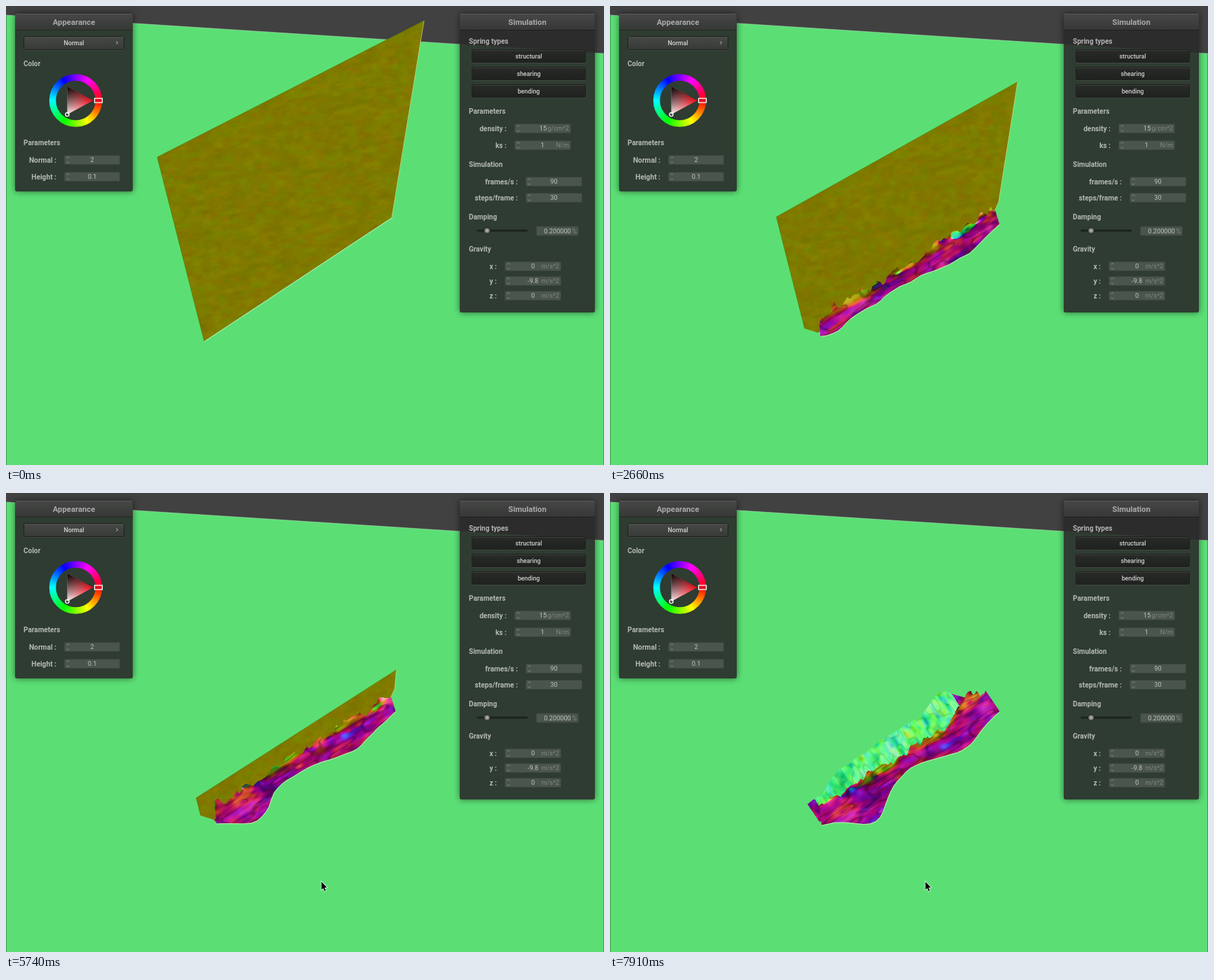
Write an HTML page with a canvas that moves like this. It is 854x656 px and loops after 8000 ms.

```html
<!DOCTYPE html>
<html lang="en">
<head>
<meta charset="utf-8">
<title>Cloth simulation</title>
<style>
  html, body { margin: 0; width: 100%; height: 100%; overflow: hidden; background: #5bdf75; }
  canvas { display: block; }
</style>
</head>
<body>
<canvas id="stage" width="854" height="656"></canvas>
<script>
const W = 854, H = 656, LOOP = 8000, STEP = 70;
const ctx = document.getElementById('stage').getContext('2d');

const clamp = (v, a = 0, b = 1) => Math.min(b, Math.max(a, v));
const mix = (a, b, k) => a + (b - a) * k;
const mixPt = (p, q, k) => [mix(p[0], q[0], k), mix(p[1], q[1], k)];
const ramp = (v, a, b) => { const k = clamp((v - a) / (b - a)); return k * k * (3 - 2 * k); };
const bump = (v, mid, width) => Math.exp(-(((v - mid) / width) ** 2));

function layer(w, h) {
  const c = document.createElement('canvas');
  c.width = w;
  c.height = h;
  return c;
}

function trace(c, pts, close = true) {
  c.beginPath();
  pts.forEach(p => c.lineTo(p[0], p[1]));
  if (close) c.closePath();
}

function sample(n, fn) {
  return Array.from({ length: n + 1 }, (_, i) => fn(i / n));
}

// ---- noise and normal shading ----
function hash(x, y, s) {
  let n = Math.imul(x, 374761393) ^ Math.imul(y, 668265263) ^ Math.imul(s, 1274126177);
  n = Math.imul(n ^ (n >>> 13), 1274126177);
  return ((n ^ (n >>> 16)) >>> 0) / 2147483648 - 1;
}

function noise(x, y, s) {
  const i = Math.floor(x), j = Math.floor(y);
  let a = x - i, b = y - j;
  a *= a * (3 - 2 * a);
  b *= b * (3 - 2 * b);
  return mix(mix(hash(i, j, s), hash(i + 1, j, s), a),
             mix(hash(i, j + 1, s), hash(i + 1, j + 1, s), a), b);
}

const rough = (x, y, s) => noise(x, y, s) + 0.6 * noise(x * 2.1, y * 2.1, s + 9);

// writes a unit normal as a colour; base is the mean normal
function putNormal(data, o, base, amp, u, v, seed, light = 1) {
  const x = base[0] + amp * rough(u, v, seed);
  const y = base[1] + amp * rough(u, v, seed + 1);
  const z = base[2] + amp * rough(u, v, seed + 2);
  const k = 127 / (Math.hypot(x, y, z) || 1);
  data[o] = light * (127 + x * k);
  data[o + 1] = light * (127 + y * k);
  data[o + 2] = light * (127 + z * k);
  data[o + 3] = 255;
}

// ---- static scene ----
function box(c, x, y, w, h, fill, stroke) {
  c.beginPath();
  c.roundRect(x, y, w, h, 2);
  if (fill) { c.fillStyle = fill; c.fill(); }
  if (stroke) { c.strokeStyle = stroke; c.lineWidth = 1; c.stroke(); }
}

function disc(c, x, y, r, fill) {
  c.beginPath();
  c.arc(x, y, r, 0, 7);
  c.fillStyle = fill;
  c.fill();
}

function gradient(c, [x0, y0], [x1, y1], from, to) {
  const g = c.createLinearGradient(x0, y0, x1, y1);
  g.addColorStop(0, from);
  g.addColorStop(1, to);
  return g;
}

function text(c, s, x, y, size = 10, align = 'left', color = 'rgba(255,255,255,.64)', weight = 700) {
  c.font = `${weight} ${size}px Roboto, sans-serif`;
  c.textAlign = align;
  c.textBaseline = 'middle';
  c.fillStyle = color;
  c.fillText(s, x, y + 0.7);
}

function panel(c, x, y, w, h, title) {
  c.save();
  c.beginPath();
  c.rect(0, 0, W, H);
  c.rect(x, y, w, h);
  c.clip('evenodd');
  c.shadowColor = 'rgba(0,0,0,.55)';
  c.shadowBlur = 10;
  box(c, x, y, w, h, '#000');
  c.restore();
  box(c, x, y, w, h, 'rgba(43,43,43,.9)');
  box(c, x, y, w, 23, gradient(c, [0, y], [0, y + 23], '#464746', '#363836'));
  c.fillStyle = 'rgba(255,255,255,.1)';
  c.fillRect(x + 1, y, w - 2, 1);
  c.fillStyle = 'rgba(0,0,0,.3)';
  c.fillRect(x, y + 23, w, 1);
  text(c, title, x + w / 2, y + 12, 11.3, 'center', 'rgba(220,220,220,.68)');
}

function button(c, x, y, w, h, label, top, bottom) {
  box(c, x, y, w, h, gradient(c, [0, y], [0, y + h], top, bottom));
  box(c, x + 0.5, y + 1.5, w - 1, h - 1, null, 'rgba(92,92,92,.4)');
  box(c, x + 0.5, y + 0.5, w - 1, h - 1, null, '#1d1f1d');
  text(c, label, x + w / 2, y + h / 2, 8.8, 'center', 'rgba(255,255,255,.78)', 500);
}

function input(c, x, y, w, value, vx, unit = '', spin = true) {
  box(c, x, y, w, 14, 'rgba(255,255,255,.13)');
  box(c, x + 0.5, y + 0.5, w - 1, 13, null, 'rgba(0,0,0,.2)');
  if (spin) {
    c.strokeStyle = 'rgba(255,255,255,.32)';
    for (const d of [-1, 1]) {
      const cy = y + 7 + d * 3.5;
      trace(c, [[x + 3.5, cy - d], [x + 5.5, cy + d], [x + 7.5, cy - d]], false);
      c.stroke();
    }
  }
  text(c, value, vx, y + 7, 9.2, 'center', 'rgba(255,255,255,.66)', 400);
  text(c, unit, x + w - 3, y + 7, 9.2, 'right', 'rgba(255,255,255,.3)', 400);
}

function row(c, label, x, y, w, value, vx, unit) {
  text(c, label + ' :', x - 11, y, 10.2, 'right');
  input(c, x, y - 7, w, value, vx, unit);
}

function colorWheel(c, x, y) {
  const hue = c.createConicGradient(0, x, y);
  for (let i = 0; i <= 12; i++) hue.addColorStop(i / 12, `hsl(${i * 30},100%,50%)`);
  c.strokeStyle = hue;
  c.lineWidth = 9.5;
  c.beginPath();
  c.arc(x, y, 33, 0, 7);
  c.stroke();
  const tip = [x + 25, y], black = [x - 12, y - 20], white = [x - 12, y + 20];
  trace(c, [tip, black, white]);
  c.fillStyle = gradient(c, tip, white, '#f00010', '#fff');
  c.fill();
  c.fillStyle = gradient(c, black, mixPt(tip, white, 0.5), '#000', 'rgba(0,0,0,0)');
  c.fill();
  c.strokeStyle = '#fff';
  c.lineWidth = 1.3;
  c.beginPath();
  c.arc(white[0], white[1], 2.6, 0, 7);
  c.stroke();
  c.fillStyle = '#e01020';
  c.fillRect(x + 27, y - 3, 11, 6);
  c.strokeRect(x + 27, y - 3, 11, 6);
}

function drawScene() {
  const cv = layer(W, H), c = cv.getContext('2d');
  c.fillStyle = '#5bdf75';
  c.fillRect(0, 0, W, H);
  c.fillStyle = '#414141';
  trace(c, [[0, 0], [W, 0], [W, 68], [0, 13]]);
  c.fill();
  c.strokeStyle = 'rgba(185,225,190,.5)';
  trace(c, [[0, 13], [W, 68]], false);
  c.stroke();
  c.fillStyle = 'rgba(20,40,20,.4)';
  c.fillRect(0, 13, 1, H);
  c.fillRect(W - 1, 68, 1, H);

  panel(c, 13, 11, 168, 254, 'Appearance');
  button(c, 25, 43, 144, 20, 'Normal', '#484a48', '#363936');
  c.strokeStyle = 'rgba(255,255,255,.75)';
  trace(c, [[157.5, 50.5], [159.5, 52.5], [157.5, 54.5]], false);
  c.stroke();
  text(c, 'Color', 25, 82);
  colorWheel(c, 99.5, 135);
  text(c, 'Parameters', 25, 195);
  row(c, 'Normal', 83, 220, 80, '2', 123);
  row(c, 'Height', 83, 244, 80, '0.1', 123);

  panel(c, 648, 11, 193, 427, 'Simulation');
  text(c, 'Spring types', 661, 50);
  ['structural', 'shearing', 'bending'].forEach((s, i) =>
    button(c, 665, 62 + i * 25, 163, 19, s, '#292b29', '#1f211f'));
  text(c, 'Parameters', 661, 150);
  row(c, 'density', 726, 175, 81, '15', 767, 'g/cm^2');
  row(c, 'ks', 726, 199, 81, '1', 766, 'N/m');
  text(c, 'Simulation', 661, 226);
  row(c, 'frames/s', 742, 251, 81, '90', 782.5);
  row(c, 'steps/frame', 742, 274, 81, '30', 782.5);
  text(c, 'Damping', 661, 301.5);
  box(c, 672, 319.5, 73, 3, 'rgba(0,0,0,.42)');
  disc(c, 687, 321, 5, '#242624');
  disc(c, 687, 321, 4, '#626462');
  disc(c, 687, 321, 2.5, '#a4a8a4');
  input(c, 757, 314.5, 61, '0.200000', 787.5, '%', false);
  text(c, 'Gravity', 661, 347.5);
  ['0', '-9.8', '0'].forEach((s, i) => row(c, 'xyz'[i], 712, 372 + i * 21, 81, s, 752.5, 'm/s^2'));
  return cv;
}

// ---- cloth ----
const SHEET = { x: 200, y: 10, w: 410, h: 480 };
const PILE = { x: 272, y: 264, w: 290, h: 230 };
const START = 420, GONE = 6860;
const OUT = [0.56, 0.828];   // screen direction in which folds spill forward

function weave() {
  const cv = layer(SHEET.w, SHEET.h), c = cv.getContext('2d');
  const img = c.createImageData(SHEET.w, SHEET.h);
  for (let y = 0, o = 0; y < SHEET.h; y++)
    for (let x = 0; x < SHEET.w; x++, o += 4)
      putNormal(img.data, o, [0, -0.04, -1], 0.06, (x - y * 0.2) / 13, (x * 0.2 + y) / 7, 3);
  c.putImageData(img, 0, 0);
  return cv;
}

// drop of the top edge: damped start, then slowing with perspective
function drop(t) {
  const s = Math.max(0, t - START) / 1000;
  return 54.5 * (s - 0.55 * (1 - Math.exp(-s / 0.55))) - s * s;
}

function pose(t) {
  const k = drop(t) / 264, m = k + 0.05 * k * (1 - k);
  const q = clamp((t - START) / 1470);
  const tl = mixPt([216, 216], [279, 465], m), tr = mixPt([597, 21], [552, 285], k);
  const l1 = mixPt([283, 479], [278, 461], q), r1 = mixPt([551, 302], [555, 280], q);
  const foot = [mixPt([283, 479], [297, 467], q), mixPt([551, 302], [547, 298], q)];
  return {
    t, q, tl, tr, foot,
    standing: t < GONE,
    sheet: [tl, tr, tr[1] > r1[1] ? tr : r1, foot[1], foot[0], tl[1] > l1[1] ? tl : l1]
  };
}

// point at share s along the foot line, pushed out by e pixels
function spill(p, s, e) {
  const [x, y] = mixPt(p.foot[0], p.foot[1], s);
  return [x + OUT[0] * e, y + OUT[1] * e];
}

// two lobes of cloth: the right one early, the left one late
function frontEdge(p) {
  const grow = ramp(p.t, START, 2600), late = ramp(p.t, 3000, 7500);
  return sample(36, s => {
    const body = 4 + 12 * Math.sqrt(s) + mix(12, 18, late) * bump(s, 0.75, 0.15);
    const lobe = mix(8, 38, late) * bump(s, mix(0.07, 0.22, late), mix(0.06, 0.14, late));
    return spill(p, s, grow * (body + lobe + 2.5 * noise(s * 16, p.t / 900, 60)));
  });
}

function flapEdge(p) {
  const rise = ramp(p.t, 4700, 6500);
  return sample(30, k => {
    const s = k * 0.9;
    const h = 26 + 17 * ramp(s, 0.06, 0.22) + 11 * bump(s, 0.8, 0.06) - 16 * ramp(s, 0.83, 0.9);
    return spill(p, s, -rise * (h + 3 * noise(s * 22, p.t / 900, 61)));
  });
}

// y of the line where the standing sheet meets the folds
function crease(p, x) {
  const y = mix(479, 456, p.q) - (x - 283) * mix(0.66, 0.624, p.q);
  if (!p.standing) return y - 22 * ramp(x, 478, 515);
  const k = (x - p.tl[0]) / (p.tr[0] - p.tl[0]);
  return Math.max(y, mix(p.tl[1], p.tr[1], k) + 6);
}

const pile = layer(PILE.w, PILE.h), pileCtx = pile.getContext('2d');

function flapPixel(d, o, u, v) {
  const light = clamp(0.85 + 0.6 * Math.abs(noise(u / 7, v / 14, 45)), 0, 1);
  if (u < 12 || u > 258) putNormal(d, o, [0.1, -0.8, 0], 0.45, u / 10, v / 8, 50, light);
  else putNormal(d, o, [-0.28, 0.85, 0.02], 0.46, u / 9, v / 14, 40, light);
}

function frontPixel(d, o, u, v, depth, flow) {
  const k = clamp(depth / 18);
  const base = [mix(0.1, 0.26, k), mix(-0.1, -0.9, k), mix(-0.5, 0.05, k)];
  const fold = Math.abs(noise(u / 22, (v - flow) / 7, 30));
  putNormal(d, o, base, mix(0.55, 0.46, k), u / 20 + flow / 12, (v - flow) / 9, 20,
    clamp(0.66 + 1.2 * fold, 0, 1));
}

function shadePile(p, front) {
  const img = pileCtx.createImageData(PILE.w, PILE.h), d = img.data, flow = p.t / 260;
  for (let i = 0; i < PILE.w; i++) {
    const x = PILE.x + i, line = crease(p, x);
    const y0 = Math.max(0, Math.floor(line - (front ? 9 : 90) - PILE.y));
    const y1 = Math.min(PILE.h, line + (front ? 95 : 40) - PILE.y);
    for (let j = y0; j < y1; j++) {
      const y = PILE.y + j, o = (j * PILE.w + i) * 4, depth = y - line;
      const u = 0.844 * x - 0.536 * y, v = 0.536 * x + 0.844 * y;
      if (!front) flapPixel(d, o, u, v);
      else if (depth > 8 || depth > 8 * p.q * rough(x / 10, p.t / 500, 70))
        frontPixel(d, o, u, v, depth, flow);
    }
  }
  pileCtx.putImageData(img, 0, 0);
}

function clipped(pts, paint) {
  ctx.save();
  trace(ctx, pts);
  ctx.clip();
  paint();
  ctx.restore();
}

function outline(pts, color) {
  ctx.lineWidth = 1;
  ctx.strokeStyle = color;
  trace(ctx, pts, false);
  ctx.stroke();
}

function drawFlap(p) {
  const foot = [spill(p, 0.9, 4), spill(p, 0.05, 4), spill(p, 0, 4)];
  shadePile(p, false);
  clipped(flapEdge(p).concat(foot), () => ctx.drawImage(pile, PILE.x, PILE.y));
}

function drawSheet(p) {
  const { tl, tr, sheet } = p;
  const a = (tr[0] - tl[0]) / 381, b = (tr[1] - tl[1] + 195) / 381;
  clipped(sheet, () => {
    ctx.transform(a, b, 0, 1, tl[0] - a * 216, tl[1] - b * 216 - 216);
    ctx.drawImage(cloth, SHEET.x, SHEET.y);
  });
  outline([sheet[5], tl, tr], 'rgba(80,125,0,.7)');
  outline(sheet.slice(1, 4), 'rgba(225,225,150,.6)');
}

function drawFront(p) {
  const low = frontEdge(p);
  const top = sample(24, k => mix(p.standing ? 547 : 529, 297, k)).map(x => [x, crease(p, x) - 9]);
  if (p.q > 0.02) {
    shadePile(p, true);
    clipped(low.concat(top), () => ctx.drawImage(pile, PILE.x, PILE.y));
  }
  outline(low.map(([x, y]) => [x + 0.4, y + 0.6]), 'rgba(235,235,195,.75)');
}

function drawPointer(x, y) {
  const shape = [[0, 0], [0, 11.5], [2.5, 9.2], [4.4, 13.4], [6.2, 12.6], [4.4, 8.5], [7.8, 8.2]];
  trace(ctx, shape.map(q => [x + q[0], y + q[1]]));
  ctx.fillStyle = '#000';
  ctx.strokeStyle = '#fff';
  ctx.lineWidth = 1.4;
  ctx.stroke();
  ctx.fill();
}

const scene = drawScene(), cloth = weave();
let last = -1;

function render(t) {
  const p = pose(t);
  ctx.drawImage(scene, 0, 0);
  if (t > 5000) drawFlap(p);
  if (p.standing) drawSheet(p);
  drawFront(p);
  if (t >= 4480) drawPointer(450.5, 555.5);
}

function tick() {
  const t = Math.floor((performance.now() % LOOP) / STEP + 1e-6) * STEP;
  if (t !== last) render(last = t);
  requestAnimationFrame(tick);
}
tick();
</script>
</body>
</html>
```
